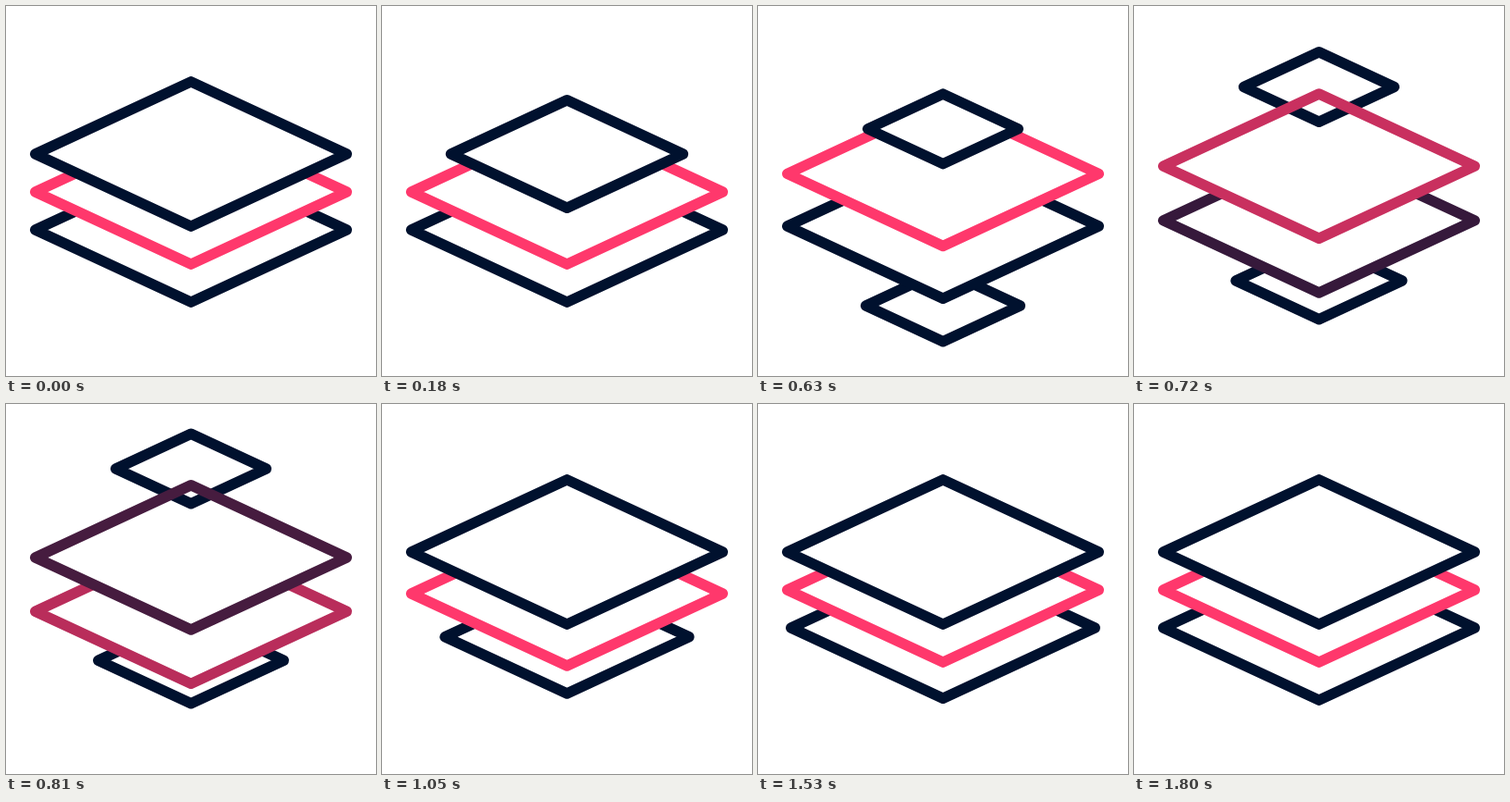
Animation, 400 px wide and 400 px high, one loop 1.83 s. Source, as an HTML page with a canvas:

```html
<!DOCTYPE html>
<html lang="en">
<head>
<meta charset="utf-8">
<title>Layers</title>
<style>
  html, body { margin: 0; width: 100%; height: 100%; overflow: hidden; background: #fff; }
  canvas { display: block; width: 400px; height: 400px; }
</style>
</head>
<body>
<canvas id="stage" width="400" height="400"></canvas>
<script>
const ctx = document.getElementById('stage').getContext('2d');
const LOOP = 1830, STEP = 30;
const FULL = 168.3, SMALL = 81.3, RATIO = 78 / 168;
const NAVY = [0, 17, 46], PINK = [255, 56, 108];

const mix = (a, b, p) => a + (b - a) * p;
const blend = (a, b, p) => `rgb(${a.map((v, i) => Math.round(mix(v, b[i], p)))})`;

// Cubic Bezier easing with control points (a, 0) and (b, 1).
function ease(t, start, length, a = 0.333, b = 0.667) {
  const x = Math.min(1, Math.max(0, (t - start) / length));
  let lo = 0, hi = 1;
  for (let i = 0; i < 24; i++) {
    const u = (lo + hi) / 2, v = 1 - u;
    if (3 * u * v * v * a + 3 * u * u * v * b + u * u * u < x) lo = u;
    else hi = u;
  }
  return hi * hi * (3 - 2 * hi);
}

function diamond(y, half, color, filled = true, stroked = true) {
  const h = half * RATIO;
  ctx.beginPath();
  ctx.moveTo(200 - half, y);
  ctx.lineTo(200, y - h);
  ctx.lineTo(200 + half, y);
  ctx.lineTo(200, y + h);
  ctx.closePath();
  if (filled) ctx.fill();
  ctx.strokeStyle = color;
  if (stroked) ctx.stroke();
}

function draw(t) {
  ctx.fillStyle = '#fff';
  ctx.fillRect(0, 0, 400, 400);
  ctx.lineWidth = 11.5;
  ctx.lineJoin = 'round';

  const navy = blend(NAVY, NAVY, 0);
  const tint = ease(t, 646, 250);

  // New layer rising from below
  if (t >= 570) {
    const y = mix(335, 242, ease(t, 540, 900, 0.2, 0.1));
    diamond(y, mix(SMALL, FULL, ease(t, 540, 1290, 0.27, 0.33)), navy);
  }

  diamond(mix(242, 201, ease(t, 500, 680)), FULL, blend(NAVY, PINK, tint));

  const midY = mix(201, 160, ease(t, 312, 655));
  const midColor = blend(PINK, NAVY, tint);
  const topY = mix(160, 70, ease(t, 540, 270, 0.33, 0.55));
  const topHalf = mix(FULL, SMALL, ease(t, 0, 550, 0.23, 0.32));
  const leaving = t >= 700;

  // The departing layer turns hollow and slips behind the next outline
  diamond(midY, FULL, midColor, true, !leaving);
  ctx.globalAlpha = 1 - ease(t, 810, 120);
  diamond(topY, topHalf, navy, !leaving);
  ctx.globalAlpha = 1;
  if (leaving) diamond(midY, FULL, midColor, false);
}

const origin = performance.now();
function frame() {
  const t = (performance.now() - origin) % LOOP;
  draw(Math.floor(t / STEP) * STEP);
  requestAnimationFrame(frame);
}
frame();
</script>
</body>
</html>
```
